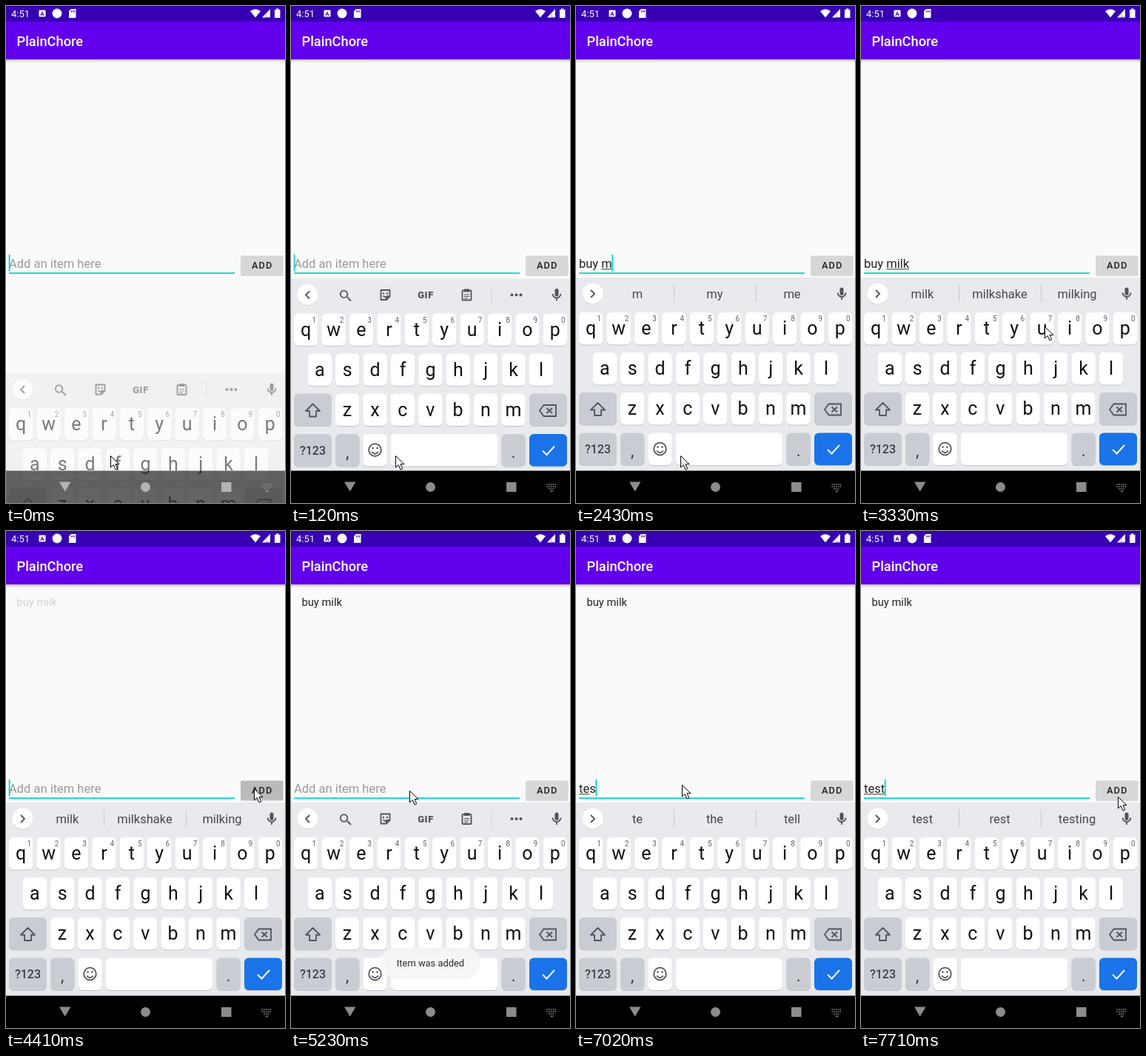
Write an HTML page that moves like this. It is 377x670 px and loops after 7.99 s.

```html
<!DOCTYPE html>
<html lang="en">
<head>
<meta charset="utf-8">
<title>To-do demo</title>
<style>
  html, body { margin: 0; width: 100%; height: 100%; overflow: hidden; background: #fafafa; }
  svg { display: block; width: 100vw; height: 100vh; }
  text { font-family: Roboto, "Noto Sans", sans-serif; white-space: pre; }
  .mid { text-anchor: middle; }
  .line { fill: none; stroke: #50555a; stroke-width: 1.8; }
</style>
</head>
<body>
<svg id="stage" viewBox="0 0 377 670"></svg>
<script>
const LOOP = 7990, INPUT_X = 4, INPUT_SIZE = 16.5;

const rect = (x, y, w, h, fill, more = '') =>
  `<rect x="${x}" y="${y}" width="${w}" height="${h}" fill="${fill}" ${more}/>`;
const circle = (x, y, r, fill, more = '') =>
  `<circle cx="${x}" cy="${y}" r="${r}" fill="${fill}" ${more}/>`;
const path = (d, more = '') => `<path d="${d}" ${more}/>`;
const text = (s, x, y, size, fill, more = '') =>
  `<text x="${x}" y="${y}" font-size="${size}" fill="${fill}" ${more}>${s}</text>`;
const group = (id, body) => `<g id="${id}">${body}</g>`;

const MID = 'class="mid"', LINE = 'class="line"', MEDIUM = 'font-weight="500"';

function key(x, y, w, fill = '#fff') {
  return rect(x, y + 1, w, 43.5, '#bfc3c8', 'rx="6"') + rect(x, y, w, 43.5, fill, 'rx="6"');
}

function letters(row, x, y, hints) {
  return [...row].map((c, i) => {
    const cx = x + 37.4 * i;
    return key(cx - 16.2, y, 32.4) + text(c, cx, y + 30, 25, '#111', MID) +
      (hints ? text((i + 1) % 10, cx + 11, y + 12, 10, '#5f6368', MID) : '');
  }).join('');
}

function statusBar() {
  return rect(0, 0, 377, 21, '#3700b3') + text('4:51', 7, 15, 13, '#fff') +
    rect(44.5, 5.5, 9, 9, '#fff', 'rx="1"') +
    text('A', 49, 13.2, 8, '#3700b3', MID + ' font-weight="700"') +
    circle(69, 10, 6.5, '#fff') +
    path('M88 4H94.5V16H85V7Z', 'fill="#fff"') +
    path('M88.5 6V8.5M90.5 6V8.5M92.5 6V8.5', 'stroke="#3700b3"') +
    path('M330 7Q337 1.5 344 7L337 15.5Z M346 15.5L357 4V15.5Z M363 5H365V3.5H368.500V5H370.500V16H363Z', 'fill="#fff"') +
    path('M352 10.500V15H357', 'stroke="#3700b3" fill="none" opacity=".35"');
}

function toolIcons() {
  return path('M76 391L81 396M71.500 382.200a4.800 4.800 0 1 0 .1 0', LINE) +
    path('M121.500 381.500H133.500V390L129 394.500H121.500ZM124.500 389Q127.500 393 130.500 389M133 390H129V394', LINE + ' stroke-linejoin="round"') +
    circle(125, 386, 1.2, '#50555a') + circle(130, 386, 1.2, '#50555a') +
    text('GIF', 182, 392.5, 13, '#50555a', MID + ' font-weight="900" letter-spacing=".6"') +
    rect(231.5, 382, 12, 13, 'none', LINE + ' rx="1"') + rect(234, 380, 7, 4, '#50555a') +
    path('M234 387.500H241M234 390H241M234 392.500H239', 'stroke="#50555a" stroke-width="1.2"') +
    rect(270.5, 377, 1, 22, '#cfd2d6') +
    [298.5, 304.5, 310.5].map(x => circle(x, 388, 2, '#50555a')).join('');
}

function suggestions() {
  return [83, 187.5, 292].map(x => text('', x, 394, INPUT_SIZE, '#44484c', MID)).join('') +
    rect(132, 376, 1, 23, '#c6c9cd') + rect(243, 376, 1, 23, '#c6c9cd');
}

function keyboard() {
  const grey = '#c9cdd3';
  return rect(0, 366, 377, 262, '#e8eaed') +
    circle(22.5, 388.5, 14, '#cfd2d5') + circle(22.5, 387.7, 14, '#fff') +
    path('', 'id="chevron" ' + LINE) +
    group('tools', toolIcons()) + group('words', suggestions()) +
    rect(356.5, 379.5, 5, 10.5, '#50555a', 'rx="2.5"') +
    path('M353.500 386.500a5.500 5.500 0 0 0 11 0M359 392V396', LINE) +
    letters('qwertyuiop', 20.2, 413, true) +
    letters('asdfghjkl', 38.8, 467, false) +
    key(4, 521, 51, grey) + letters('zxcvbnm', 76, 521, false) + key(322, 521, 51, grey) +
    path('M29.500 535L39 544.500H34V552H25V544.500H20Z', LINE + ' stroke-linejoin="round"') +
    path('M341.500 536.500H358V551.500H341.500L336 544ZM345.500 540.500L353 547.500M353 540.500L345.500 547.500', LINE) +
    key(4, 575.5, 51, grey) + text('?123', 29.5, 603, 16, '#3c4043', MID + MEDIUM) +
    key(60, 575.5, 32.4, grey) + text(',', 76.2, 607, 22, '#333', MID) +
    key(97.3, 575.5, 32.4) + circle(113.5, 597, 8.3, 'none', LINE) +
    circle(110.5, 594.5, 1.3, '#50555a') + circle(116.5, 594.5, 1.3, '#50555a') +
    path('M109 599.500Q113.500 605 118 599.500', LINE) +
    key(134.700, 575.5, 144.5) +
    key(284.5, 575.5, 32.4, grey) + text('.', 300.7, 607, 22, '#333', MID) +
    key(322, 575.5, 51, '#1a73e8') +
    path('M340 598L345.500 603.500L356 592', 'fill="none" stroke="#fff" stroke-width="2"');
}

function navBar() {
  return rect(0, 626.5, 377, 43.5, '#000', 'id="navBack"') +
    '<g id="navIcons">' + path('M72 641.500H87.500L79.700 654.500Z') +
    circle(188.5, 648.5, 6.5, 'inherit').replace('fill="inherit"', '') +
    path('M291 642H304.500V655H291Z') +
    path('M345.500 645H359M345.500 648H359M348 651H356.500', 'fill="none" stroke="#858585" stroke-width="1.7" stroke-dasharray="1.7 1"') +
    path('M350 653.500H355L352.500 655.500Z') + '</g>';
}

document.getElementById('stage').innerHTML = `
  <defs><linearGradient id="shade" x2="0" y2="1">
    <stop stop-color="#c9c9c9"/><stop offset="1" stop-color="#fafafa"/>
  </linearGradient></defs>` +
  rect(0, 0, 377, 670, '#fafafa') + rect(0, 72, 377, 4.5, 'url(#shade)') +
  rect(0, 20, 377, 52, '#6200ee') + statusBar() +
  text('PlainChore', 14.5, 53.5, 18.3, '#fff', MEDIUM) +
  text('buy milk', 14.5, 100.5, 14.7, '#212121', 'id="item"') +
  text('Add an item here', INPUT_X, 353, INPUT_SIZE, '#9a9a9a', 'id="hint"') +
  text('', INPUT_X, 353, INPUT_SIZE, '#212121', 'id="typed"') +
  rect(0, 354.3, 0, 1, '#333', 'id="mark"') +
  rect(INPUT_X, 359.3, 305, 1.8, '#03d5cb') +
  rect(0, 335, 1.8, 22.5, '#03d5cb', 'id="caret"') +
  rect(317, 337.5, 57.5, 26.5, '#000', 'rx="2" opacity=".14"') +
  rect(317, 336.5, 57.5, 26, '#d6d7d7', 'id="button" rx="2"') +
  text('ADD', 346.2, 354, 12.8, '#212121', MID + MEDIUM + ' letter-spacing="1.1"') +
  group('board', keyboard()) + navBar() +
  group('toast', rect(121, 561, 135, 43, '#f5f6f7', 'rx="21.5" opacity=".9"') +
    text('Item was added', 188.5, 587, 12.9, '#2a2a2a', MID)) +
  path('M.5 .5V16L4.200 12.600L7 19L9.700 17.800L7 11.600H12Z', 'id="mouse" fill="#fff" stroke="#000" stroke-linejoin="round"');

// Each step lists only what changes; "under" is where the composing underline ends.
const steps = [
  [0, { drop: 129, solid: .55, nav: .6, typed: '', under: 0, caret: 1, words: null,
        item: 0, toast: 0, button: '#d6d7d7', mouse: [141, 606] }],
  [120, { drop: 1.5, solid: 1, nav: 1 }],
  [270, { drop: 0 }],
  [520, { caret: 0 }],
  [830, { typed: 'b', caret: 1 }],
  [1140, { under: 1, words: ['b', 'be', 'but'] }],
  [1290, { typed: 'bu' }],
  [1570, { under: 2, words: ['bu', 'but', 'by'] }],
  [1850, { typed: 'buy' }],
  [2000, { under: 3, words: ['buy', 'but', 'buying'] }],
  [2280, { typed: 'buy ', under: 0, words: ['a', 'the', 'it'] }],
  [2410, { typed: 'buy m', under: 5, words: ['m', 'my', 'me'] }],
  [2540, { typed: 'buy mi', under: 6, words: ['mi', 'mine', 'might'] }],
  [2660, { typed: 'buy mil', under: 7, words: ['mil', 'milk', 'mill'] }],
  [2790, { typed: 'buy milk', under: 8, words: ['milk', 'milkshake', 'milking'] }],
  [2920, { mouse: [182, 565] }],
  [3050, { mouse: [222, 500] }],
  [3180, { mouse: [243, 448], caret: 0 }],
  [3330, { mouse: [248, 432] }],
  [3460, { mouse: [262, 462] }],
  [3600, { mouse: [300, 515], caret: 1 }],
  [3740, { mouse: [340, 524] }],
  [3880, { mouse: [362, 470] }],
  [4020, { mouse: [354, 400], caret: 0 }],
  [4160, { mouse: [340, 355] }],
  [4290, { mouse: [335, 347], button: '#c6c7c7' }],
  [4410, { typed: '', under: 0, caret: 1, item: .18, button: '#b9baba' }],
  [4540, { item: 1, words: null, toast: .5 }],
  [4680, { button: '#d6d7d7', toast: 1 }],
  [4810, { mouse: [270, 354] }],
  [4950, { mouse: [179, 354] }],
  [5230, { mouse: [160, 350], caret: 0 }],
  [5360, { mouse: [147, 344] }],
  [5500, { mouse: [143, 342], caret: 1 }],
  [5930, { caret: 0 }],
  [6360, { caret: 1 }],
  [6490, { toast: .4 }],
  [6620, { toast: 0, typed: 't' }],
  [6760, { under: 1, words: ['t', 'the', 'to'] }],
  [6890, { typed: 'te', under: 2, words: ['te', 'the', 'tell'] }],
  [7020, { typed: 'tes' }],
  [7160, { under: 3, words: ['tes', 'yes', 'test'] }],
  [7290, { typed: 'test' }],
  [7410, { under: 4, words: ['test', 'rest', 'testing'], mouse: [195, 344] }],
  [7560, { mouse: [295, 352] }],
  [7710, { mouse: [347, 358] }]
];

const el = id => document.getElementById(id);
const set = (id, attrs) => {
  for (const name in attrs) el(id).setAttribute(name, attrs[name]);
};
const pen = document.createElement('canvas').getContext('2d');
pen.font = INPUT_SIZE + 'px Roboto, "Noto Sans", sans-serif';
const widthOf = s => pen.measureText(s).width;

function draw(s) {
  set('board', { transform: `translate(0 ${s.drop})`, opacity: s.solid });
  set('navBack', { opacity: s.nav });
  set('navIcons', { fill: s.nav < 1 ? '#b4b4b4' : '#8c8c8c' });
  set('hint', { opacity: s.typed ? 0 : 1 });
  el('typed').textContent = s.typed;

  const start = widthOf(s.typed.slice(0, s.typed.lastIndexOf(' ') + 1));
  const end = widthOf(s.typed.slice(0, s.under));
  set('mark', { x: INPUT_X + start, width: Math.max(0, end - start) });
  set('caret', { x: INPUT_X - .3 + widthOf(s.typed), opacity: s.caret });

  set('tools', { opacity: s.words ? 0 : 1 });
  set('words', { opacity: s.words ? 1 : 0 });
  set('chevron', { d: s.words ? 'M20 383L25 388L20 393' : 'M25 383L20 388L25 393' });
  if (s.words) el('words').querySelectorAll('text').forEach((w, i) => w.textContent = s.words[i]);

  set('item', { opacity: s.item });
  set('toast', { opacity: s.toast });
  set('button', { fill: s.button });
  set('mouse', { transform: `translate(${s.mouse})` });
}

function tick() {
  const t = performance.now() % LOOP;
  draw(Object.assign({}, ...steps.filter(([at]) => at <= t).map(([, change]) => change)));
  requestAnimationFrame(tick);
}
tick();
</script>
</body>
</html>
```
